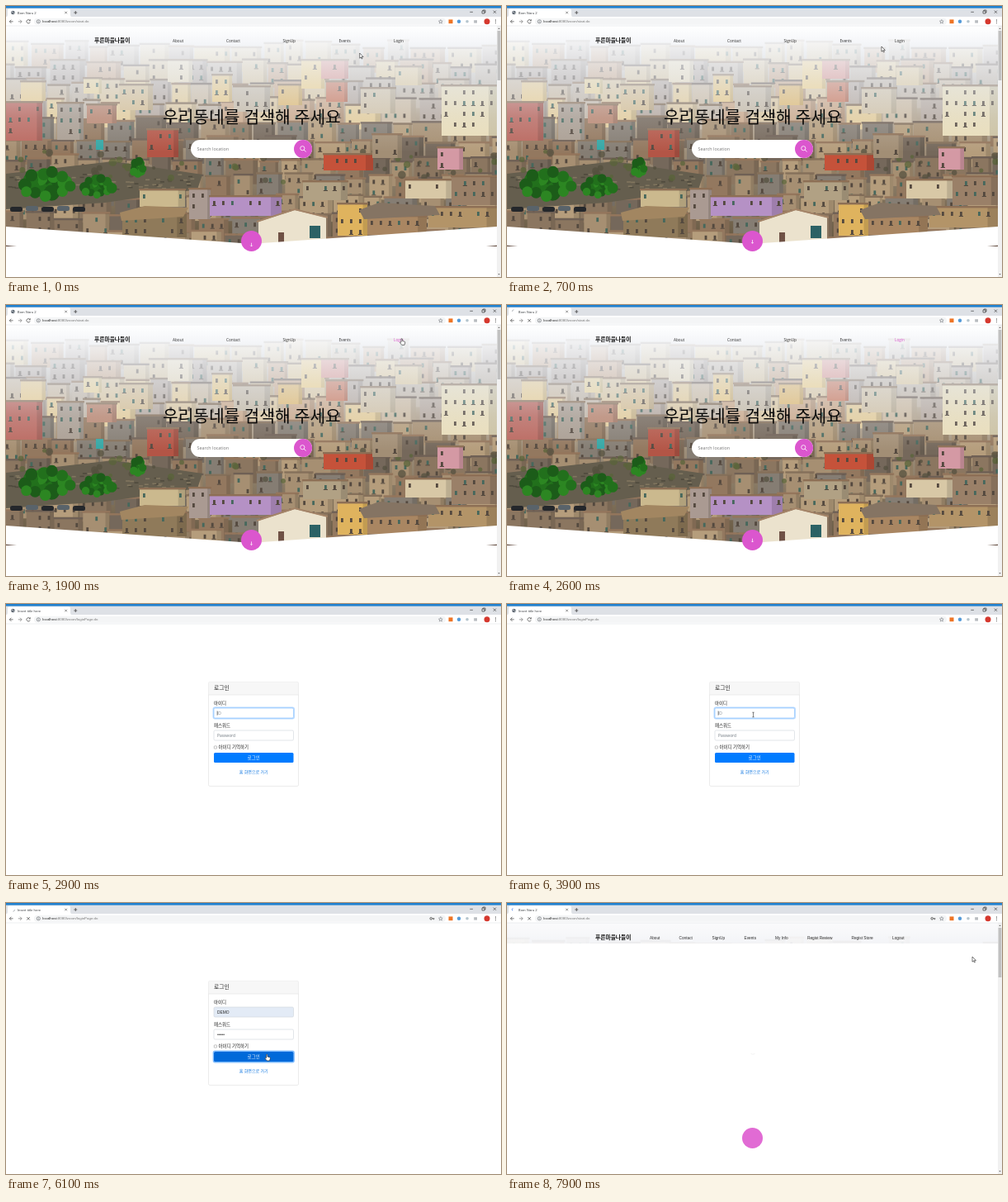
Write an HTML page that moves like this. It is 600 by 328 pixels and loops after 8 s.

```html
<!DOCTYPE html>
<html lang="ko">
<head>
<meta charset="utf-8">
<title>Town search</title>
<style>
html, body { margin: 0; width: 100%; height: 100%; overflow: hidden; background: #fff; }
svg { display: block; width: 100%; height: 100%; }
text { font-family: "Open Sans", "Noto Sans CJK KR", "Noto Sans CJK", sans-serif; white-space: pre; }
.ui { font-family: "Liberation Sans", "Noto Sans CJK KR", "Noto Sans CJK", sans-serif; }
</style>
</head>
<body>
<svg id="stage" viewBox="0 0 600 328" preserveAspectRatio="none"></svg>
<script>
const LOOP = 8000;
const HOME_TITLE = "Bom Naru 2";
const BRAND = "푸른마을나들이";
const PINK = "#db56ce";

const rect = (x, y, w, h, fill, more = "") =>
  `<rect x="${x}" y="${y}" width="${w}" height="${h}" fill="${fill}" ${more}/>`;
const circle = (x, y, r, fill, more = "") =>
  `<circle cx="${x}" cy="${y}" r="${r}" fill="${fill}" ${more}/>`;
const line = (d, color, width = 0.7, more = "") =>
  `<path d="${d}" fill="none" stroke="${color}" stroke-width="${width}" ${more}/>`;
const shape = (d, fill, more = "") => `<path d="${d}" fill="${fill}" ${more}/>`;
const text = (x, y, size, str, fill = "#222", more = "") =>
  `<text x="${x}" y="${y}" font-size="${size}" fill="${fill}" ${more}>${str}</text>`;
const group = (id, body, more = "") => `<g id="${id}" ${more}>${body}</g>`;
const stops = list => list.map(([at, color, alpha = 1]) =>
  `<stop offset="${at}" stop-color="${color}" stop-opacity="${alpha}"/>`).join("");

function seeded(seed) {
  return () => (seed = (seed * 16807) % 2147483647) / 2147483647;
}

function house(x, y, w, h, wall, rnd, roof = "#8b7259") {
  let s = rect(x, y, w, h, wall);
  s += rect(x - 1, y - 2, w + 2, 2.4, roof);
  s += rect(x + w * 0.85, y, w * 0.15, h, "#000", 'opacity=".13"');
  for (let wy = y + 5; wy < y + h - 6; wy += 13) {
    for (let wx = x + 4; wx < x + w - 5; wx += 11) {
      if (rnd() < 0.3) continue;
      s += rect(wx.toFixed(1), wy.toFixed(1), 2.8, 5, rnd() < 0.3 ? "#46685d" : "#54493f");
      if (rnd() < 0.3) s += rect((wx - 1.2).toFixed(1), (wy + 5).toFixed(1), 5.2, 1, "#54493f");
    }
  }
  return s;
}

function tree(x, y, w, h, rnd) {
  let s = "";
  for (let i = 0; i < 24; i++) {
    const a = i * 2.4, d = Math.sqrt(i / 24);
    s += circle((x + Math.cos(a) * d * w * 0.42).toFixed(1), (y + Math.sin(a) * d * h * 0.36).toFixed(1),
      (h * (0.14 + rnd() * 0.08)).toFixed(1), ["#22701c", "#2c8622", "#1c5c19"][i % 3]);
  }
  return s;
}

function town() {
  const rnd = seeded(73);
  const pale = ["#dcc8a2", "#cdbca4", "#e4cd9c", "#b7aaa0", "#cba98a", "#c3b7a8"];
  const earthy = ["#8b7660", "#a68f72", "#75685b", "#b59d7c", "#93785f", "#857d73"];
  const roofs = ["#85705a", "#94765c", "#6f6055"];
  let s = rect(0, 24, 595, 264, "url(#hill)");
  for (let y = 42; y < 280; y += 23) {
    const walls = y < 120 ? pale : earthy;
    for (let x = -8 - rnd() * 14; x < 595;) {
      const w = 20 + rnd() * 24, top = y + rnd() * 10;
      s += house(+x.toFixed(1), +top.toFixed(1), +w.toFixed(1), 29,
        walls[rnd() * walls.length | 0], rnd, roofs[rnd() * 3 | 0]);
      x += w + rnd() * 5;
    }
  }
  // stone terrace and scrub
  s += shape("M0 203L60 196L130 188L238 204L232 222L120 238L0 246Z", "#655e4e");
  for (let i = 0; i < 70; i++)
    s += rect((rnd() * 225).toFixed(1), (203 + rnd() * 18).toFixed(1), 5, 1.6, i % 2 ? "#81765f" : "#4f4a3d");
  for (let i = 0; i < 60; i++)
    s += circle((rnd() * 595).toFixed(1), (176 + rnd() * 40).toFixed(1), (2 + rnd() * 3).toFixed(1),
      i % 2 ? "#59643a" : "#54503f", 'opacity=".75"');

  const upper = [
    [18, 92, 30, 23, "#e9cd92"], [0, 117, 44, 46, "#b9675e"], [62, 118, 32, 44, "#a99d91"],
    [94, 88, 22, 18, "#ead49b"], [98, 120, 36, 22, "#b98670"], [138, 96, 40, 30, "#d6bf95"],
    [171, 150, 38, 33, "#b35546"], [196, 66, 30, 26, "#ebdcba"], [250, 84, 24, 32, "#e8c986"],
    [276, 98, 44, 30, "#c6baa6"], [330, 96, 29, 24, "#dfb970"], [358, 66, 28, 34, "#f0cf84"],
    [382, 66, 33, 22, "#dc9189"], [388, 92, 26, 24, "#c9775c"], [430, 100, 42, 30, "#d2c3a8"],
    [472, 74, 32, 22, "#dfc899"], [528, 97, 67, 60, "#e8dcb8"]
  ];
  const lower = [
    [385, 180, 60, 19, "#c5523a"], [444, 156, 36, 28, "#a28e75"], [523, 172, 31, 26, "#d499a4"],
    [162, 223, 55, 20, "#cbb98e"], [222, 222, 26, 36, "#aa9a92"], [247, 231, 87, 23, "#b591c5"],
    [141, 252, 78, 28, "#8f7a5a"], [360, 213, 54, 22, "#b1a184"], [484, 211, 58, 22, "#d8c8a6"],
    [540, 207, 55, 34, "#9a8068"], [402, 240, 36, 38, "#dfb35e"], [438, 255, 72, 22, "#a98662"],
    [512, 244, 83, 24, "#b39468"]
  ];
  for (const h of upper) s += house(...h, rnd);
  for (const h of lower) s += house(...h, rnd, "#8d6f55");
  s += shape("M306 288V261L350 247L388 256V288Z", "#ebe2cd");
  s += line("M304 261L350 246L390 256", "#a48468", 2);
  s += rect(368, 266, 13, 15, "#2c6265") + rect(330, 274, 7, 12, "#6f5145") + rect(109, 162, 9, 12, "#35a7a5");
  s += shape("M138 250L168 242L221 244L215 255L140 260Z", "#a28661");
  s += shape("M428 247L452 238L520 242L526 253L434 258Z", "#857463");
  s += tree(49, 216, 74, 44, rnd) + tree(111, 219, 44, 30, rnd) + tree(160, 196, 15, 24, rnd);
  for (let i = 0; i < 5; i++)
    s += rect(5 + i * 19, 243 - i % 2, 15, 6, i % 2 ? "#59636a" : "#24272b", 'rx="2.5"');
  return s + rect(0, 24, 595, 264, "url(#fog)");
}

const nav = (items, cls) => items.map(([x, label]) =>
  text(x, 43.7, cls ? 4.75 : 4.7, label, "#2b2b2b", `class="${cls}" ${label === "Login" ? 'id="loginLink"' : ""}`)).join("");

const brand = text(107, 44.4, 6.75, BRAND, "#111", 'font-weight="700"');

const scrollbar = rect(595, 24, 5, 304, "#f1f1f1") + rect(595.6, 30, 3.8, 60, "#c1c1c1") +
  shape("M596.3 28L597.5 26.5L598.7 28Z", "#666") + shape("M596.3 324L597.5 325.5L598.7 324Z", "#666");

function homePage() {
  return rect(0, 24, 600, 304, "#fff") + group("photo", town()) +
    shape("M0 267L285 287H310L595 267V328H0Z", "#fff") +
    shape("M0 289.8L13 291H0Z", "#5c4438") + shape("M595 289.8L582 291H595Z", "#5c4438") +
    brand + nav([[202, "About"], [267, "Contact"], [335.5, "SignUp"], [403.5, "Events"], [470, "Login"]], "") +
    text(190, 142.2, 20.3, "우리동네를 검색해 주세요", "#080808", 'font-weight="300"') +
    rect(224, 162, 147, 22, "#fff", 'rx="11"') + text(231.5, 175, 5.45, "Search location", "#777") +
    circle(360, 173, 11, PINK) +
    circle(359.3, 172.2, 2.6, "none", 'stroke="#fff" stroke-width=".8"') + line("M361.2 174.1L363.6 176.5", "#fff", 0.9) +
    circle(297.5, 284.5, 12.5, PINK) +
    group("bob", line("M0 -2.3V2M-1.3 .7L0 2L1.3 .7", "#fff", 0.7)) + scrollbar;
}

function memberPage() {
  return rect(0, 24, 600, 304, "#fff") +
    `<use href="#photo" clip-path="url(#strip)"/>` + rect(0, 24, 595, 25, "#f3f3f5", 'opacity=".45"') +
    brand + nav([[173, "About"], [208.5, "Contact"], [248.5, "SignUp"], [287.5, "Events"], [325, "My Info"],
      [364, "Regist Review"], [417.5, "Regist Store"], [467, "Logout"]], "ui") +
    line("M295.5 182.3Q298 184.2 300.5 182.3", "#eeeeec", 0.7) +
    circle(297.5, 284.5, 12.5, "#e16bd4") + scrollbar;
}

const field = (id, y) =>
  rect(251.3, y - 0.7, 97.9, 13.4, "none", `id="${id}Ring" rx="2" stroke="#007bff" stroke-opacity=".28" stroke-width="1.5"`) +
  rect(252, y, 96.5, 12, "#fff", `id="${id}Box" rx="1.5" stroke="#ced4da" stroke-width=".6"`);

function loginPage() {
  return rect(0, 24, 600, 304, "#fff") +
    rect(245.5, 94.3, 109, 126.2, "#fff", 'rx="1.6" stroke="#dfdfdf" stroke-width=".6"') +
    rect(245.8, 94.6, 108.4, 15.4, "#f7f7f7") + line("M245.5 110H354.5", "#dfdfdf", 0.6) +
    text(252, 104.3, 6.8, "로그인") +
    text(252, 121.8, 5.45, "아이디") + field("id", 126) + text(256, 134, 4.9, "", "#222", 'id="idText" class="ui"') +
    text(252, 148.8, 5.45, "패스워드") + field("pw", 153) +
    text(256, 160.9, 4.9, "Password", "#6c757d", 'id="pwHint"') +
    group("dots", Array.from({ length: 5 }, (_, i) => circle(256.9 + i * 1.8, 159.3, 0.72, "#333")).join("")) +
    rect(0, 0, 0.5, 5.4, "#222", 'id="caret"') +
    rect(252.3, 171.9, 3.2, 3.2, "#fff", 'rx=".4" stroke="#888" stroke-width=".5"') +
    text(257.6, 175.4, 5.45, "아이디 기억하기") +
    rect(251.4, 179.3, 97.7, 13.4, "none", 'id="btnRing" rx="2" stroke="#007bff" stroke-opacity=".5" stroke-width="1.5"') +
    rect(252, 180, 96.5, 12, "#007bff", 'id="btn" rx="1.5"') +
    text(300.2, 187.9, 5.45, "로그인", "#fff", 'text-anchor="middle"') +
    text(300.2, 204.9, 5, "홈 화면으로 가기", "#1479e0", 'text-anchor="middle"');
}

function browser() {
  const ink = "#5f6368";
  return rect(0, 0, 600, 13, "#dee1e6") + rect(0, 0, 600, 2.6, "#1f80cf") +
    shape("M0 13.2Q2 13 2 11V5.5Q2 3.3 4.2 3.3H75.8Q78 3.3 78 5.5V11Q78 13 80 13.2Z", "#fff") +
    rect(0, 13, 600, 11, "#fff") + line("M0 24H600", "#dadce0", 0.5) +
    group("globe", circle(8.4, 8, 2.3, "#5d6670") + shape("M6.8 7L8.4 6.4L8 8.6ZM9 8L10.2 8.4L9 9.6Z", "#dfe3e8")) +
    group("spinner", line("M0 -2.2A2.2 2.2 0 0 1 2.2 0", "#8a9097", 0.7, 'id="arc"')) +
    text(13.8, 9.6, 4.3, "", "#45484c", 'id="tabTitle" class="ui"') +
    line("M71.3 6.7L73.9 9.3M73.9 6.7L71.3 9.3", "#444", 0.6) + line("M82.3 8H86.3M84.3 6V10", "#333", 0.7) +
    line("M562.3 7.3H565.9M577 6H580V9H577ZM578 6V5H581V8H580M590.8 5.6L594 8.8M594 5.6L590.8 8.8", "#222", 0.6) +
    line("M8.6 18.8H4.4M6.4 16.7L4.3 18.8L6.4 20.9", "#444", 0.7) +
    line("M14.8 18.8H19M17 16.7L19.1 18.8L17 20.9", "#777", 0.7) +
    group("reload", line("M29 17.6A2.2 2.2 0 1 0 29.2 19.5M29.3 16.2V17.9H27.6", "#444", 0.7)) +
    group("stop", line("M25.3 17L28.9 20.6M28.9 17L25.3 20.6", "#444", 0.7)) +
    rect(34, 14.8, 499, 8, "#f4f5f6", 'rx="4"') +
    circle(39.3, 18.8, 2.1, "none", `stroke="${ink}" stroke-width=".6"`) + line("M39.3 18.4V20M39.3 17.3V17.8", ink, 0.6) +
    `<text x="44.3" y="20.4" font-size="4.4" class="ui" fill="#777"><tspan fill="#222">localhost</tspan><tspan id="path"></tspan></text>` +
    group("key", circle(515.2, 18.8, 1.3, "none", 'stroke="#444" stroke-width=".8"') + line("M516.5 18.8H519.3M518.5 18.8V20.2", "#444", 0.8)) +
    line("M526.8 16.5L527.5 18.1L529.2 18.2L527.9 19.3L528.4 21L526.8 20.1L525.3 21L525.7 19.3L524.4 18.2L526.1 18.1Z", ink, 0.5) +
    rect(536.5, 16.4, 5, 4.8, "#ee7424") + circle(549, 18.8, 2.2, "#559bd8") +
    circle(559, 18.8, 1.8, "#b5c5ce") + rect(567.2, 17.2, 3.8, 3.4, "#b8bcc0") +
    circle(583, 18.8, 3.5, "#d5382e") +
    [16.9, 18.8, 20.7].map(y => circle(593.4, y, 0.55, "#444")).join("");
}

const pointers =
  group("arrow", shape("M0 0V6.2L1.5 4.9L2.5 7L3.4 6.6L2.5 4.5H4.4Z", "#fff", 'stroke="#222" stroke-width=".6"')) +
  group("hand", shape("M0 0Q.8 -.8 1.4 0V2.5L4.2 3.2Q5 3.5 4.7 5L4 7.4H.8L-1.6 4.4Q-1.2 3.3 0 4.2Z", "#fff", 'stroke="#222" stroke-width=".6"')) +
  group("beam", line("M-1.2 -2.8H1.2M0 -2.8V2.8M-1.2 2.8H1.2", "#333", 0.6));

const stage = document.getElementById("stage");
stage.innerHTML =
  `<defs><linearGradient id="hill" x2="0" y2="1">${stops([[0, "#e3e8ef"], [0.4, "#b5a692"], [1, "#65563f"]])}</linearGradient>
  <linearGradient id="fog" x2="0" y2="1">${stops([[0, "#fff", 1], [0.09, "#f6f8fb", 0.88],
    [0.26, "#e6ecf4", 0.55], [0.42, "#e6ecf4", 0.2], [0.58, "#fff", 0]])}</linearGradient>
  <clipPath id="strip"><rect x="0" y="24" width="595" height="25"/></clipPath></defs>` +
  group("home", homePage()) + group("login", loginPage()) + group("member", memberPage()) +
  browser() + pointers;

const el = {};
stage.querySelectorAll("[id]").forEach(n => el[n.id] = n);
const show = (id, on) => { el[id].style.display = on ? "" : "none"; };
const move = (id, x, y) => el[id].setAttribute("transform", `translate(${x} ${y})`);
const paint = (id, name, value) => el[id].setAttribute(name, value);
const between = (t, a, b) => t >= a && t < b;

// the member page reuses the photo, so the home page must stay rendered beneath it
const cover = (id, on) => el[id].setAttribute("visibility", on ? "visible" : "hidden");

// time, x, y
const route = [
  [0, 428.7, 57], [300, 428.7, 57], [1100, 479, 41], [2400, 479, 41], [3050, 430, 70], [3700, 298.5, 134],
  [4750, 298.5, 134], [4950, 298.5, 160], [5500, 298.5, 160], [5800, 315.5, 183.5],
  [6900, 315.5, 183.5], [7700, 564, 65], [8000, 564, 65]
];

function pointerAt(t) {
  const i = route.findIndex(k => k[0] > t);
  const [t0, x0, y0] = route[i - 1], [t1, x1, y1] = route[i];
  const u = (t - t0) / (t1 - t0), e = u * u * (3 - 2 * u);
  return [x0 + (x1 - x0) * e, y0 + (y1 - y0) * e];
}

function pointerKind(t, x, y) {
  if (between(t, 2450, 3050)) return "";
  if (between(t, 1000, 2450)) return "hand";
  if (t < 2700 || t >= 7700) return "arrow";
  if (!between(x, 252, 348.5)) return "arrow";
  if (between(y, 126, 138) || between(y, 153, 165)) return "beam";
  return between(y, 180, 192) ? "hand" : "arrow";
}

function update(t) {
  const onHome = t < 2700, onMember = t >= 7700, onLogin = !onHome && !onMember;
  const loading = between(t, 2250, 2900) || t >= 5900;
  cover("login", onLogin);
  cover("member", onMember);

  el.tabTitle.textContent = onLogin ? "Insert title here" : HOME_TITLE;
  el.path.textContent = ":8080/zoom/" + (onLogin ? "loginPage.do" : "start.do");
  show("globe", !loading);
  show("reload", !loading);
  show("spinner", loading);
  show("stop", loading);
  show("key", t >= 4500);
  paint("arc", "stroke", onMember ? "#3b78e7" : "#9aa0a6");
  const turn = onMember ? t * 0.36 - 2970 : 270 - (t - 2600) * 0.36;
  paint("spinner", "transform", `translate(8.4 8) rotate(${turn})`);

  paint("loginLink", "fill", t >= 1000 ? PINK : "#2b2b2b");
  move("bob", 297.5, 287 + 2 * Math.cos(t / 1740 * Math.PI * 2));

  const idFocus = between(t, 2700, 4900), pwFocus = between(t, 4900, 5900);
  const filled = t >= 4500, count = Math.max(0, Math.min(5, Math.floor((t - 4900) / 110)));
  for (const [id, on] of [["id", idFocus], ["pw", pwFocus]]) {
    show(id + "Ring", on);
    paint(id + "Box", "stroke", on ? "#80bdff" : "#ced4da");
  }
  paint("idBox", "fill", filled ? "#e3ebf6" : "#fff");
  el.idText.textContent = filled ? "DEMO" : t >= 4200 ? "D" : "ID";
  paint("idText", "fill", t >= 4200 ? "#222" : "#8a9299");
  show("pwHint", count === 0);
  [...el.dots.children].forEach((d, i) => { d.style.display = i < count ? "" : "none"; });
  show("caret", (idFocus || pwFocus) && (t - 2800) % 1060 < 560);
  paint("caret", "x", idFocus ? (filled ? 270 : t >= 4200 ? 260 : 255.8) : 255.8 + count * 1.8);
  paint("caret", "y", idFocus ? 129.4 : 156.4);
  show("btnRing", t >= 5900);
  paint("btn", "fill", between(t, 5750, 7000) ? "#0069d9" : "#007bff");

  const [x, y] = pointerAt(t), kind = pointerKind(t, x, y);
  for (const id of ["arrow", "hand", "beam"]) show(id, id === kind);
  if (kind) move(kind, x, y);
}

const start = performance.now();
function frame() {
  update((performance.now() - start) % LOOP);
  requestAnimationFrame(frame);
}
update(0);
requestAnimationFrame(frame);
</script>
</body>
</html>
```
